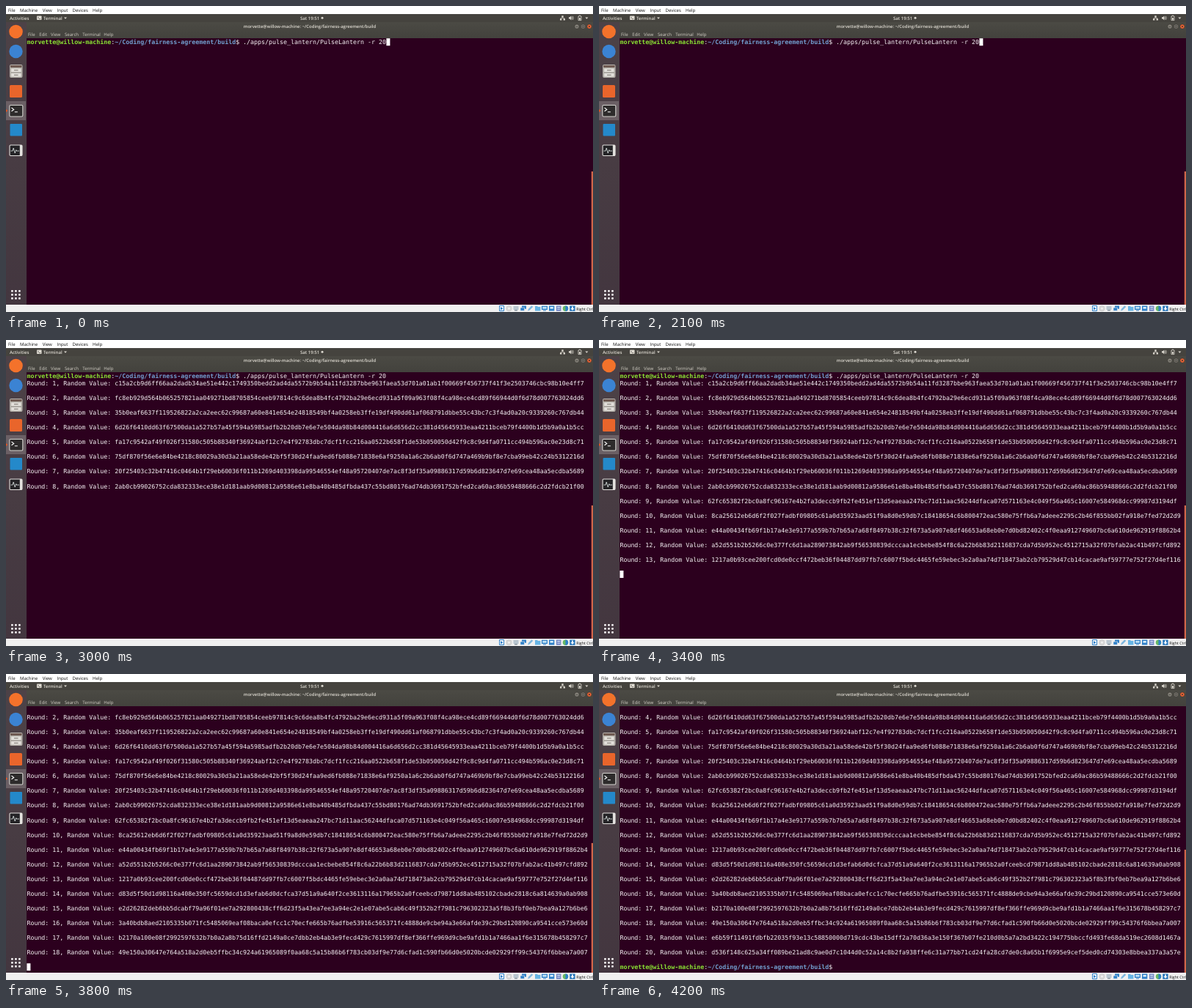
An HTML page that plays this animation: 800 px wide and 418 px high, repeating every 4.3 s.

```html
<!DOCTYPE html>
<html lang="en">
<head>
<meta charset="utf-8">
<title>Terminal session</title>
<style>
  html, body { margin: 0; height: 100%; overflow: hidden; background: #2c001e; }
  svg { display: block; width: 100vw; height: 100vh; }
  text { font-family: "Open Sans", "Noto Sans", sans-serif; font-size: 6.05px; white-space: pre; text-rendering: geometricPrecision; }
  .bold { font-weight: 600; fill: #dfdbd2; }
  #term text { font-family: "DejaVu Sans Mono", monospace; font-size: 8.305px; fill: #f6f3f5; }
  #term .user, #term .path { font-weight: bold; }
  .user { fill: #8ae234; }
  .path { fill: #729fcf; }
</style>
</head>
<body>
<svg id="stage" viewBox="0 0 800 418" xmlns="http://www.w3.org/2000/svg">
  <defs>
    <linearGradient id="head" x2="0" y2="1"><stop stop-color="#4b4a44"/><stop offset="1" stop-color="#43423d"/></linearGradient>
    <linearGradient id="side" x2="0" y2="1"><stop stop-color="#4d4247"/><stop offset="1" stop-color="#43363f"/></linearGradient>
    <clipPath id="view"><path d="M28 44H800V408H28Z"/></clipPath>
  </defs>
  <path fill="#2c001e" d="M0 0H800V418H0Z"/>

  <g id="term" clip-path="url(#view)">
    <g id="page"><rect id="cursor" width="5" height="10" fill="#fff"/></g>
    <rect id="thumb" x="797.8" width="2.2" fill="#d0664a"/>
  </g>

  <g id="bars">
    <path fill="#fff" d="M0 0H800V11H0Z"/>
    <path fill="#45433e" d="M0 11H800V22H0Z"/>
    <path fill="url(#head)" d="M28 22H800V44H28Z"/>
    <path fill="#f0f0f0" d="M0 408H800V418H0Z"/>
    <text class="bold" x="5" y="18.6">Activities</text>
    <text class="bold" x="51" y="18.6">Terminal</text>
    <text class="bold" x="401" y="18.6">Sat 19:51</text>
    <circle cx="431" cy="16.3" r="1.5" fill="#dfdbd2"/>
    <text class="bold" x="414" y="30.2" text-anchor="middle" id="title" style="font-size:5.95px"></text>
    <rect x="42" y="13.5" width="6.5" height="5.5" rx=".7" fill="#dfdbd2"/>
    <path d="M43.2 15l1.3 1-1.3 1M45 17.6h2" fill="none" stroke="#45433e" stroke-width=".7"/>
    <path d="M79 15.4h4l-2 2.3zM789.4 15.4h4l-2 2.3z" fill="#dfdbd2"/>
    <!-- network, sound, battery -->
    <path d="M757.3 13.3h2.4v2.2h-2.4zM755 17.2h2.4v2.2H755zM759.6 17.2h2.4v2.2h-2.4z" fill="#dfdbd2"/>
    <path d="M758.5 15v1.4M756.2 17.5v-1.1h4.6v1.1" fill="none" stroke="#dfdbd2" stroke-width=".6"/>
    <path d="M767 15.2h1.4l2-1.8v6l-2-1.8H767z" fill="#dfdbd2"/>
    <path d="M771.3 14.7q1 1.7 0 3.4M772.5 13.8q1.6 2.6 0 5.2" fill="none" stroke="#dfdbd2" stroke-width=".7"/>
    <path d="M780 14h1.2v-.9h1.6v.9h1.2v5.6h-4z" fill="none" stroke="#dfdbd2" stroke-width=".8"/>
    <path d="M781 16.3h2v2.5h-2z" fill="#dfdbd2"/>
    <!-- window buttons -->
    <g fill="#85827a" stroke="#302f2b" stroke-width=".5"><circle cx="778" cy="28" r="3.1"/><circle cx="786.5" cy="28" r="3.1"/><circle cx="795" cy="28" r="3.1" fill="#ee6535"/></g>
    <path d="M776.6 28.3h2.8M785.2 26.8h2.6v2.5h-2.6zM793.8 26.8l2.4 2.4m0-2.4l-2.4 2.4" fill="none" stroke="#34322e" stroke-width=".7"/>
  </g>

  <g id="dock">
    <path fill="url(#side)" d="M0 22H28V408H0Z"/>
    <path fill="#6b6065" d="M0 130H27V156H0Z"/>
    <path fill="#e95420" d="M0 141l2.3 2-2.3 2z"/>
    <circle cx="13.5" cy="35" r="9.3" fill="#f4722b"/>
    <circle cx="13.5" cy="62" r="9.2" fill="#3b83d3"/>
    <!-- file cabinet -->
    <rect x="5" y="80" width="17.5" height="18" rx="2" fill="#b9b4ae"/>
    <path fill="#6f5a52" d="M6 81H21.5V84H6Z"/>
    <path fill="#e2dfda" stroke="#99948e" stroke-width=".6" d="M6.5 85H21V90.5H6.5ZM6.5 91.5H21V97H6.5Z"/>
    <path stroke="#77716b" stroke-width="1.1" d="M11 87.7h5.5M11 94.2h5.5"/>
    <rect x="5" y="108" width="17" height="17" rx="1.5" fill="#e9652b"/>
    <!-- terminal -->
    <rect x="4.8" y="135.5" width="18" height="15.5" rx="1.4" fill="#2d2b2b" stroke="#d5d3cf" stroke-width="1.1"/>
    <path fill="none" stroke="#fff" stroke-width="1.1" d="M7.5 139l3.2 2.4-3.2 2.4M11.8 144.8h4"/>
    <rect x="5.5" y="161" width="16.5" height="16.5" rx="1" fill="#2489ca"/>
    <!-- system monitor -->
    <rect x="5" y="190" width="17" height="14.5" rx="1.2" fill="#242326" stroke="#e4e2df" stroke-width="1.1"/>
    <path fill="#e4e2df" d="M18.8 190H22V204.5H18.8Z"/>
    <path fill="none" stroke="#e8f0ef" stroke-width=".8" d="M6.5 198h2.4l1.3-4 2 7 1.6-4.4.8 1.4h3.4"/>
  </g>

  <!-- status strip -->
  <g id="status" fill="#2f80c8">
    <path fill="#fff" stroke="#2f80c8" d="M672.5 409.5h6v7h-6z"/><path d="M674 411l3.5 2.2-3.5 2.2z"/>
    <circle cx="685.5" cy="413.2" r="3.7" fill="#dadada" stroke="#bbb" stroke-width=".5"/><circle cx="685.5" cy="413.2" r="1" fill="#fff"/>
    <path fill="#b9c6d0" d="M691.5 410h7v5h-7z"/><path d="M693 415h4v1.5h-4z" fill="#8d99a3"/>
    <path d="M703 409.5h6v4.2h-6z"/><path d="M701 412h5.5v4.3H701z" stroke="#f0f0f0" stroke-width=".6"/>
    <path fill="#7cb6de" d="M711 416.5l1-2.7 4.5-4.5 1.7 1.7-4.5 4.5z"/>
    <path fill="#67b5e5" d="M721 410h3l1 1h3.5v5.5H721z"/>
    <path d="M730 409.7h8v5.2h-8zM732 415.5h4v1h-4z"/><path fill="#bfe2f5" d="M731.2 410.9h5.6v2.8h-5.6z"/>
    <path d="M740 409.5h7.3v7H740z"/><path fill="#d8effb" d="M741.5 411h4.3v2.6h-4.3z"/>
    <path fill="#6f83c4" d="M750 409.5h6.4v7.2H750z"/><path fill="#e7f4fb" d="M751.2 411h4v1h-4zM751.2 413.5h4v1h-4z"/>
    <circle cx="762.5" cy="413.2" r="3.7" fill="#67b865"/><path d="M762.5 409.5a3.7 3.7 0 0 1 0 7.4z"/>
    <path d="M768.3 409.5h7.3v7.3h-7.3z" fill="#2675bb"/><path fill="#fff" d="M771 410.5h2v2.5h1.5l-2.5 2.9-2.5-2.9h1.5z"/>
    <text x="777.2" y="415.5" fill="#111" style="font-size:5.3px">Right Ctrl</text>
  </g>
</svg>

<script>
const LOOP = 4300, STEP = 100, ENTER = 2200, FIRST = 2285, PERIOD = 82;
const LEFT = 28.4, TOP = 44, COL = 5, ROW = 10.03, ROWS = 36, VIEW = 364;
const user = "morvette@willow-machine", path = "~/Coding/fairness-agreement/build";
const command = " ./apps/pulse_lantern/PulseLantern -r 20";

const values = `
c15a2cb9d6ff66aa2dadb34ae51e442c1749350bedd2ad4da5572b9b54a11fd3287bbe963faea53d701a01ab1f00669f456737f41f3e2503746cbc98b10e4ff7
fc8eb929d564b065257821aa049271bd8705854ceeb97814c9c6dea8b4fc4792ba29e6ecd931a5f09a963f08f4ca98ece4cd89f66944d0f6d78d007763024dd6
35b0eaf6637f119526822a2ca2eec62c99687a60e841e654e24818549bf4a0258eb3ffe19df490dd61af068791dbbe55c43bc7c3f4ad0a20c9339260c767db44
6d26f6410dd63f67500da1a527b57a45f594a5985adfb2b20db7e6e7e504da98b84d004416a6d656d2cc381d45645933eaa4211bceb79f4400b1d5b9a0a1b5cc
fa17c9542af49f026f31580c505b88340f36924abf12c7e4f92783dbc7dcf1fcc216aa0522b658f1de53b050050d42f9c8c9d4fa0711cc494b596ac0e23d8c71
75df870f56e6e84be4218c80029a30d3a21aa58ede42bf5f30d24faa9ed6fb088e71838e6af9250a1a6c2b6ab0f6d747a469b9bf8e7cba99eb42c24b5312216d
20f25403c32b47416c0464b1f29eb60036f011b1269d403398da99546554ef48a95720407de7ac8f3df35a09886317d59b6d823647d7e69cea48aa5ecdba5689
2ab0cb99026752cda832333ece38e1d181aab9d00812a9586e61e8ba40b485dfbda437c55bd80176ad74db3691752bfed2ca60ac86b59488666c2d2fdcb21f00
62fc65382f2bc0a8fc96167e4b2fa3deccb9fb2fe451ef13d5eaeaa247bc71d11aac56244dfaca07d571163e4c049f56a465c16007e584968dcc99987d3194df
8ca25612eb6d6f2f027fadbf09805c61a0d35923aad51f9a8d0e59db7c18418654c6b800472eac580e75ffb6a7adeee2295c2b46f855bb02fa918e7fed72d2d9
e44a00434fb69f1b17a4e3e9177a559b7b7b65a7a68f8497b38c32f673a5a907e8df46653a68eb0e7d0bd82402c4f0eaa912749607bc6a610de962919f8862b4
a52d551b2b5266c0e377fc6d1aa289073842ab9f56530839dcccaa1ecbebe854f8c6a22b6b83d2116837cda7d5b952ec4512715a32f07bfab2ac41b497cfd892
1217a0b93cee200fcd0de0ccf472beb36f04487dd97fb7c6007f5bdc4465fe59ebec3e2a0aa74d718473ab2cb79529d47cb14cacae9af59777e752f27d4ef116
d83d5f50d1d98116a408e350fc5659dcd1d3efab6d0dcfca37d51a9a640f2ce3613116a17965b2a0fceebcd79871dd8ab485102cbade2818c6a814639a0ab908
e2d26282deb6bb5dcabf79a96f01ee7a292800438cff6d23f5a43ea7ee3a94ec2e1e07abe5cab6c49f352b2f7981c796302323a5f8b3fbf0eb7bea9a127b6be6
3a40bdb8aed2105335b071fc5485069eaf08baca0efcc1c70ecfe665b76adfbe53916c565371fc4888de9cbe94a3e66afde39c29bd120890ca9541cce573e60d
b2170a100e08f2992597632b7b0a2a8b75d16ffd2149a0ce7dbb2eb4ab3e9fecd429c7615997df8ef366ffe969d9cbe9afd1b1a7466aa1f6e315678b458297c7
49e150a30647e764a518a2d0eb5ffbc34c924a61965089f0aa68c5a15b86b6f783cb03df9e77d6cfad1c590fb66d0e5020bcde02929ff99c54376f6bbea7a007
e6b59f11491fdbfb22035f93e13c58850000d719cdc43be15dff2a70d36a3e150f367b07fe210d0b5a7a2bd3422c194775bbccfd493fe68da519ec2608d1467a
d536f148c625a34ff089be21ad8c9ae0d7c1044d0c52a14c8b2fa938ffe6c31a77bb71cd24fa28cd7de0c8a65b1f6995e9cef5ded0cd74303e8bbea337a3a57e
`.trim().split("\n");

const $ = id => document.getElementById(id);

function add(parent, tag, attrs, html = "") {
  const el = document.createElementNS("http://www.w3.org/2000/svg", tag);
  for (const key in attrs) el.setAttribute(key, attrs[key]);
  el.innerHTML = html;
  return parent.appendChild(el);
}

const line = (row, html) => add($("page"), "text", { x: LEFT, y: TOP + 8.1 + row * ROW }, html);

function menu(items, y, fill) {
  for (const [label, x] of Object.entries(items)) add($("bars"), "text", { x, y, fill }, label);
}

menu({ File: 3, Machine: 19, View: 49.7, Input: 69.5, Devices: 90.5, Help: 118 }, 8, "#111");
menu({ File: 30, Edit: 45.3, View: 61, Search: 80, Terminal: 104.3, Help: 133.3 }, 41.3, "#d3cfc6");
$("title").textContent = `${user}: ${path}`;

for (let i = 0; i < 9; i++)
  add($("dock"), "rect", { x: 7 + i % 3 * 5, y: 388 + (i / 3 | 0) * 5, width: 2.8, height: 2.8, rx: .8, fill: "#eeeaec" });

const prompt = `<tspan class="user">${user}</tspan>:<tspan class="path">${path}</tspan>$`;
line(0, prompt + command);
const rounds = values.map((value, i) => line(2 * i + 1, `Round: ${i + 1}, Random Value: ${value}`));
const lastPrompt = line(2 * values.length + 1, prompt);

const show = (el, on) => el.setAttribute("display", on ? "inline" : "none");

function draw(time) {
  const t = Math.floor(time % LOOP / STEP) * STEP;
  const n = Math.max(0, Math.min(values.length, Math.floor((t - FIRST) / PERIOD)));
  const done = n === values.length;
  const row = t < ENTER ? 0 : 2 * n + 1;
  const col = t < ENTER ? 98 : done ? 59 : 0;
  const scroll = Math.max(0, row - ROWS + 1);

  rounds.forEach((el, i) => show(el, i < n));
  show(lastPrompt, done);
  $("page").setAttribute("transform", `translate(0 ${-scroll * ROW})`);

  // the last blink stays lit until the output ends
  show($("cursor"), !done && ((t + 300) % 1200 < 600 || t === 3900));
  $("cursor").setAttribute("x", LEFT + col * COL);
  $("cursor").setAttribute("y", TOP + .2 + row * ROW);

  const height = VIEW * ROWS / (2 * ROWS + scroll);
  $("thumb").setAttribute("y", TOP + VIEW - height);
  $("thumb").setAttribute("height", height);
}

const start = performance.now();
function tick() {
  draw(performance.now() - start);
  requestAnimationFrame(tick);
}
tick();
</script>
</body>
</html>
```
